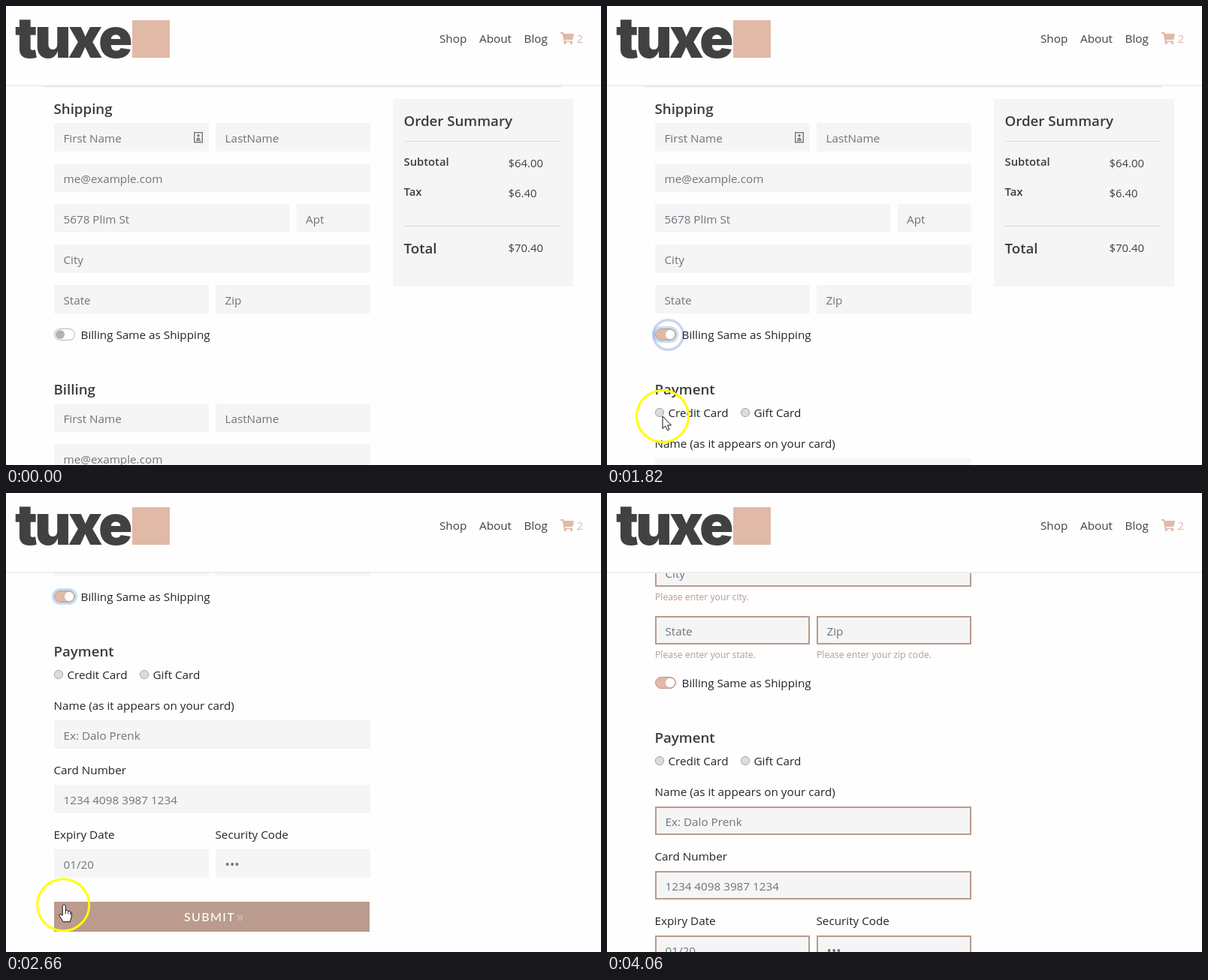
These frames come from a looping animation (792x612 px, 4770 ms). An HTML page:

```html
<!DOCTYPE html>
<html lang="en">
<head>
<meta charset="utf-8">
<title>Checkout form</title>
<style>
  html, body { margin: 0; width: 100%; height: 100%; overflow: hidden; background: #fefefe; }
  svg { display: block; width: 792px; height: 612px; }
  text { font: 15.25px "Open Sans", "Noto Sans", sans-serif; fill: #212529; white-space: pre; }
  .heading { font-size: 18.7px; font-weight: 600; fill: #3b3b3b; }
  .strong { font-size: 14.8px; font-weight: 600; fill: #3b3b3b; }
  .price, .nav { fill: #414141; }
  .price { font-size: 14.9px; }
  .field text { fill: #6c757d; }
  .field rect { fill: #f5f5f5; stroke: #f5f5f5; stroke-width: 2; }
  .field .error { display: none; font-size: 12.2px; fill: #b99b8d; }
  .invalid .field rect { stroke: #b99b8d; }
  .invalid .field .value { transform: translateX(1px); }
  .invalid .field .error { display: inline; }
  .brand { font: 900 75px Inter, sans-serif; letter-spacing: -4px; fill: #414141; }
  .peach { fill: #e0b9a7; }
  .submit text { font: 500 16px Lato, sans-serif; letter-spacing: 1.4px; fill: #fff; }
  .submit #chevrons { font-size: 21px; font-weight: 900; }
  .radio { fill: #dcdcdc; stroke: #a6a6a6; }
</style>
</head>
<body>
<svg id="stage" viewBox="0 0 792 612"></svg>
<script>
const LOOP = 4770, TICK = 140, ERROR_HEIGHT = 23;
const TOGGLE_CLICK = 1260, TOGGLED = 1400, SUBMIT_CLICK = 3080, REJECTED = 3220;

const text = (x, y, content, cls = '') => `<text x="${x}" y="${y}" class="${cls}">${content}</text>`;
const line = (x1, x2, y) => `<path d="M${x1} ${y}H${x2}" stroke="#dcdcdc"/>`;
const row = (index, content) => `<g class="row" data-index="${index}">${content}</g>`;
const radio = (x, label) => `<circle class="radio" cx="${x}" cy="542" r="5.6"/>` + text(x + 11.5, 548, label);

function field(x, y, width, placeholder, error) {
  return `<g class="field"><rect x="${x + 1}" y="${y + 1}" width="${width - 2}" height="36"/>` +
    text(x + 12.5, y + 26, placeholder, 'value') +
    (error ? text(x, y + 56, `Please enter your ${error}.`, 'error') : '') + '</g>';
}

const contactIcon = `<g fill="none" stroke="#777" stroke-width="1.4">
  <rect x="250.7" y="168.7" width="10.6" height="13"/>
  <path d="M253 179.3h6" stroke-width="1.6"/></g>
  <circle cx="256" cy="172.8" r="1.7" fill="#777"/><path d="M253 178q3-5 6 0z" fill="#777"/>`;

const nameRow = y => field(64, y, 206, 'First Name', 'first name') + field(279, y, 206, 'LastName', 'last name');
const emailRow = y => field(64, y, 421, 'me@example.com', 'email');

const shipping =
  row(0, text(63.5, 144, 'Shipping', 'heading') + nameRow(156) + contactIcon) +
  row(1, emailRow(210)) +
  row(2, field(64, 264, 313, '5678 Plim St', 'address') + field(386.5, 264, 98, 'Apt')) +
  row(3, field(64, 318, 421, 'City', 'city')) +
  row(4, field(64, 372, 206, 'State', 'state') + field(279, 372, 206, 'Zip', 'zip code'));

const toggle = `
  <rect id="halo" x="62.5" y="428.5" width="31" height="19" rx="9.5" fill="none" stroke="#c3dffb" stroke-width="3"/>
  <rect id="track" x="64.5" y="430.5" width="27" height="15" rx="7.5"/>
  <circle id="knob" cy="438" r="6"/>` + text(99.5, 444, 'Billing Same as Shipping');

const billing = `<g id="billing">${text(63.5, 518, 'Billing', 'heading')}${nameRow(530)}${emailRow(584)}</g>`;

const payment = `<g id="payment">` +
  text(63.5, 518, 'Payment', 'heading') + radio(70, 'Credit Card') + radio(184, 'Gift Card') +
  text(63.5, 589, 'Name (as it appears on your card)') + field(64, 603, 421, 'Ex: Dalo Prenk') +
  text(63.5, 675, 'Card Number') + field(64, 689, 421, '1234 4098 3987 1234') +
  text(63.5, 761, 'Expiry Date') + field(64, 775, 206, '01/20') +
  text(278.5, 761, 'Security Code') + field(279, 775, 206, '<tspan font-size="17">•••</tspan>') +
  `<g class="submit"><rect id="button" x="64" y="845" width="420" height="40"/>
   <rect id="focus" x="63.5" y="844.5" width="421" height="41" fill="none" stroke="#6f9fe0"/>
   <text id="submitLabel" y="871">SUBMIT</text><text id="chevrons" x="306.5" y="872">»</text></g></g>`;

const summary = `<rect x="515" y="124" width="240" height="250" fill="#f5f5f5"/>` +
  text(529.5, 160, 'Order Summary', 'heading') + line(530, 738, 180.5) +
  text(529.5, 213, 'Subtotal', 'strong') + text(668.5, 215, '$64.00', 'price') +
  text(529.5, 253, 'Tax', 'strong') + text(668.5, 255, '$6.40', 'price') + line(530, 738, 293.5) +
  text(529.5, 330, 'Total', 'heading') + text(668.5, 328, '$70.40', 'price');

const header = `<rect width="792" height="108" y="-1" fill="#eee"/><rect width="792" height="105" fill="#fefefe"/>` +
  text(12, 69, 'tuxe', 'brand') + `<rect class="peach" x="168" y="19" width="50" height="50"/>` +
  text(577, 49, 'Shop', 'nav') + text(630, 49, 'About', 'nav') + text(689.5, 49, 'Blog', 'nav') +
  `<g class="peach"><path d="M738 35h4l.6 2H756l-1.8 8h-10l.3 1.5h9.2l-.3 1.5h-10.6L740.6 37H738z"/>
   <circle cx="744.3" cy="49.3" r="1.8"/><circle cx="752.5" cy="49.3" r="1.8"/></g>` + text(759.5, 49, '2', 'peach');

const pointer = `<circle id="ring" fill="none" stroke="#2b3ab0" stroke-width="3.5"/>
  <g id="cursor">
    <circle id="highlight" r="34.5" fill="none" stroke="#ff0" stroke-width="3"/>
    <path id="arrow" d="M0 0V16.5L3.8 13 6.5 18.8 9 17.7 6.5 12H11.5Z" fill="#fff" stroke="#111"/>
    <path id="hand" d="M-1 1Q1-2 3 1V8Q5 6 6.5 8.5 8.5 7 9.5 9.5 11 8.5 11 11.5V16L9 22.500H0L-5.500 14Q-5.500 11-1 14Z
      M3 8v4M6.5 9v3M9.5 10v3" fill="#fff" stroke="#111"/>
  </g>`;

const stage = document.getElementById('stage');
stage.innerHTML = `<g id="page">${line(50, 739, 107.5)}${shipping}${row(5, toggle + billing + payment)}${summary}</g>${header}${pointer}`;

const $ = id => document.getElementById(id);
const rows = [...document.querySelectorAll('.row')];
const set = (id, attributes) => Object.entries(attributes).forEach(([key, value]) => $(id).setAttribute(key, value));
const show = (id, visible) => { $(id).style.display = visible ? '' : 'none'; };
const between = (time, start, end) => time >= start && time < end;
const progress = (time, start, end) => {
  const p = Math.min(1, Math.max(0, (time - start) / (end - start)));
  return p * p * (3 - 2 * p);
};

// Cursor stops: time, x, y
const path = [
  [0, 110, 670], [700, 79, 451], [980, 79, 451], [1260, 81, 438], [1400, 81, 452], [1820, 74, 547],
  [2380, 74, 547], [2800, 77, 550], [3640, 77, 550], [4060, 74, 670]
];

function cursorAt(time) {
  const next = path.findIndex(stop => stop[0] > time);
  if (next < 0) return path[path.length - 1].slice(1);
  const [start, x1, y1] = path[next - 1], [end, x2, y2] = path[next];
  const p = progress(time, start, end);
  return [x1 + (x2 - x1) * p, y1 + (y2 - y1) * p];
}

function drawClick(time) {
  const second = time >= SUBMIT_CLICK;
  const age = time - (second ? SUBMIT_CLICK : TOGGLE_CLICK);
  show('ring', between(age, 0, 700));
  set('ring', {
    cx: second ? 77 : 81.5, cy: second ? 550 : 438.5,
    r: 9.5 + Math.max(0, age) * 0.0185, opacity: Math.max(0, 1 - age / 720)
  });
}

function draw(time) {
  const on = time >= TOGGLED, rejected = time >= REJECTED;
  const hovering = between(time, 2660, REJECTED);

  set('page', { transform: `translate(0 ${-300 * progress(time, 1820, 2380)})` });
  $('page').classList.toggle('invalid', rejected);
  rows.forEach(el => el.setAttribute('transform', `translate(0 ${rejected ? el.dataset.index * ERROR_HEIGHT : 0})`));

  show('billing', !on);
  show('payment', on);
  show('halo', on && time < REJECTED);
  set('track', { fill: on ? '#e0b9a7' : '#fff', stroke: on ? '#b99b8d' : '#b3b5b7' });
  set('knob', { cx: on ? 84 : 72, fill: on ? '#fff' : '#b0b2b4' });

  const hover = hovering ? progress(time, 2520, 2940) : 0;
  set('button', { fill: hovering ? '#ba9b8d' : '#e0b9a7' });
  show('focus', between(time, SUBMIT_CLICK, REJECTED));
  set('submitLabel', { x: 240 - 12 * hover });
  set('chevrons', { opacity: hover });

  const [x, y] = cursorAt(time);
  set('cursor', { transform: `translate(${x} ${y})` });
  show('arrow', !hovering);
  show('hand', hovering);
  show('highlight', !between(time, TOGGLE_CLICK, 1540) && !between(time, SUBMIT_CLICK, REJECTED));
  drawClick(time);
}

// The picture advances in fixed ticks, with one held tick and a long final hold.
function tickTime(now) {
  const time = Math.floor((now % LOOP) / TICK) * TICK;
  return time === 2520 ? 2380 : Math.min(time, 4060);
}

function animate() {
  draw(tickTime(performance.now()));
  requestAnimationFrame(animate);
}
animate();
</script>
</body>
</html>
```
